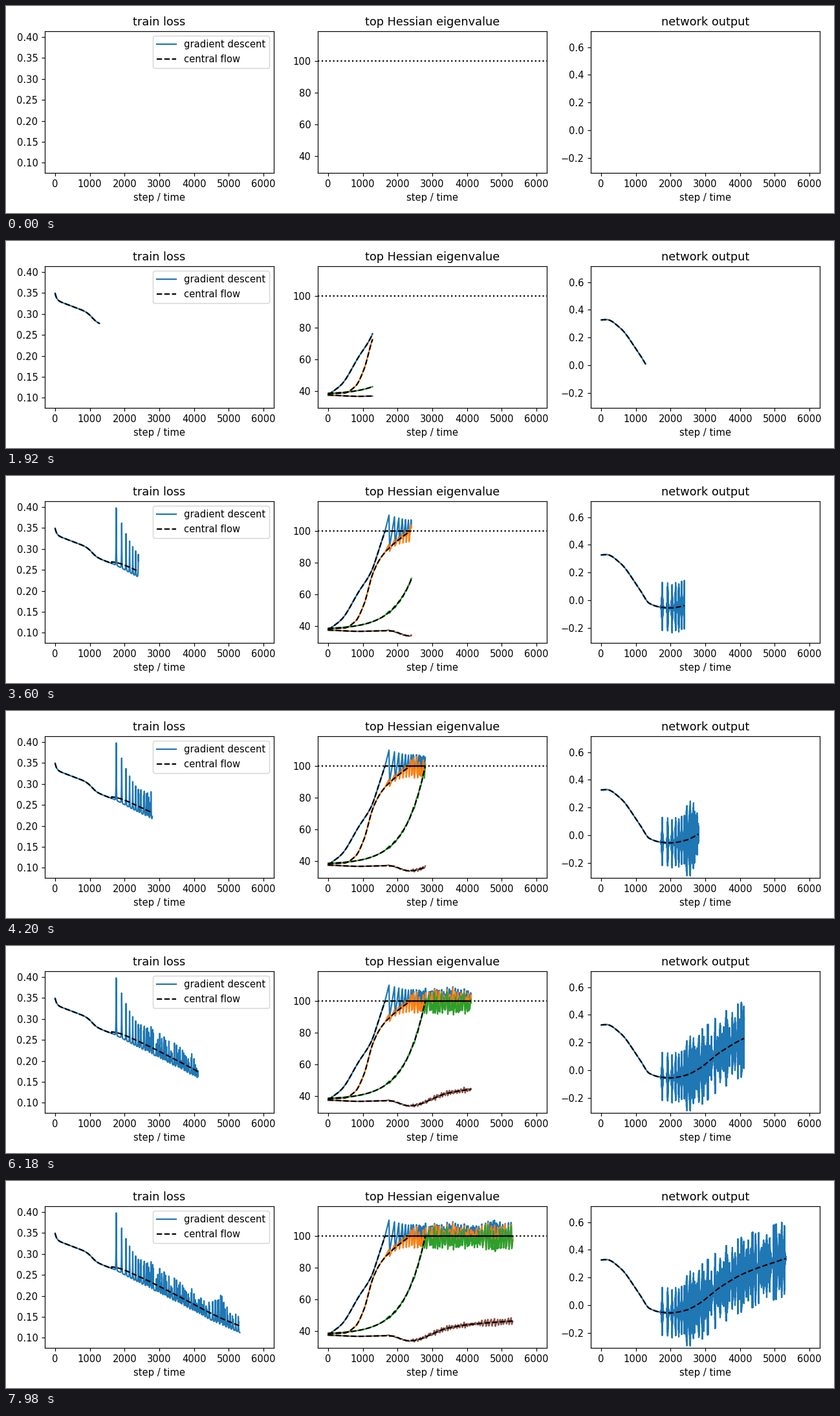
Animation, 1280 px wide and 320 px high, one loop 8 s. Source, as a matplotlib script:

```python
import numpy as np
import matplotlib.pyplot as plt
from matplotlib.animation import FuncAnimation

W, H = 1280, 320
LOOP_MS, FRAMES, STRIDE = 8000, 267, 20
END, EDGE = 5400, 1640  # last step, start of the oscillating regime
steps = np.arange(END + 1)
rng = np.random.default_rng(5)


def curve(*points):
    """Monotone cubic through a few (step, value) points."""
    x, y = np.array(points, float).T
    h, d = np.diff(x), np.diff(y) / np.diff(x)
    m = np.concatenate([d[:1], np.zeros(len(d) - 1), d[-1:]])
    same = d[:-1] * d[1:] > 0
    a, b = d[:-1][same], d[1:][same]
    m[1:-1][same] = 2 * a * b / (a + b)
    i = np.clip(np.searchsorted(x, steps, side="right") - 1, 0, len(h) - 1)
    u = np.clip((steps - x[i]) / h[i], 0, 1)
    return (y[i] * (1 + 2 * u) * (1 - u) ** 2 + y[i + 1] * u**2 * (3 - 2 * u)
            + h[i] * u * (1 - u) * (m[i] * (1 - u) - m[i + 1] * u))


def spike_train(t, extra_gap, extra_amp):
    """Spikes that settle to a steady rhythm, then turn irregular."""
    train, k = [], 0
    while t < END + 150:
        jitter = np.clip((t - 2400) / 300, 0, 1)
        amp = 6 + extra_amp * .75**k + rng.uniform(-1.6, 1.8) * jitter
        amp += 4 * np.exp(-((t - 4760) / 130) ** 2)
        train.append((t, amp))
        t += 70 + extra_gap * .62**k + rng.uniform(-12, 30) * jitter
        k += 1
    return train


def sawtooth(start, train):
    """Slow rise to each spike, then a sharp drop."""
    x, y = [start], [0]
    for t, amp in train:
        x += [t - 5, t + 12]
        y += [amp, -amp]
    return np.interp(steps, x, y, left=0)


def pulse(t, width):
    return np.exp(-np.abs(steps - round(t)) / width)


# Smooth flow
early_loss = (.3335 + .016 * np.exp(-steps / 45) - 3.1e-5 * steps
              - .0175 / (1 + np.exp((1060 - steps) / 75)))
late_loss = curve((EDGE, .2692), (1800, .2668), (2300, .2505), (3460, .2032),
                  (4720, .149), (END, .1255))
loss_flow = np.where(steps < EDGE - 15, early_loss, late_loss)

out_flow = curve((0, .327), (150, .330), (557, .267), (1116, .076), (1395, -.023),
                 (1730, -.050), (2000, -.055), (2420, -.037), (2810, .010),
                 (3428, .130), (4118, .230), (END, .345))

eig_flow = [
    curve((0, 37.5), (400, 44.5), (880, 61.6), (1240, 74.2), (1440, 86.5),
          (EDGE, 100), (1700, 104)),
    curve((0, 38.4), (450, 38.7), (785, 43), (1030, 53.5), (1285, 72.9),
          (1500, 82.5), (1755, 89.2), (2360, 100), (2500, 102.4)),
    38 + 15.7 * np.exp((steps - 1985) / 592),
    curve((0, 37.5), (880, 36.7), (1750, 37.1), (2350, 33.8), (3440, 41.8),
          (4130, 44.3), (END, 46.5)),
]
eig_flow = [np.minimum(e, 100) for e in eig_flow]

# Three unstable directions, each with its own train of spikes
trains = [spike_train(1760, 88, 4), spike_train(2459, 40, 0), spike_train(2960, 20, 0)]
saws = [sawtooth(t0, tr) for t0, tr in zip((EDGE, 2360, 2870), trains)]

# Discrete descent
eigs = [
    eig_flow[0] + saws[0] + .2 * saws[1],
    eig_flow[1] + saws[1] + .24 * saws[0],
    eig_flow[2] + saws[2] + .08 * saws[0] + .15 * saws[1],
]
ranked = np.sort(eigs, axis=0)[::-1]
eigs = [np.where(steps > EDGE, r, e) for r, e in zip(ranked, eigs)]
eigs.append(eig_flow[3] + .04 * saws[0] + .13 * saws[1] + .17 * saws[2])

bump = np.zeros(END + 1)
swing = np.zeros(END + 1)
for train in trains:
    for t, amp in train:
        height = .00137 * amp**2 * np.exp((1760 - t) / 5000)
        bump = np.maximum(bump, height * pulse(t, 6))
        size = rng.uniform(.16, .25) * rng.choice([-1, 1]) if t > 2420 else .18
        swing += size * pulse(t, 12)

sag = .0035 + .0125 * (1 - np.exp(-(steps - EDGE) / 400))
loss = np.where(steps < EDGE, early_loss, late_loss - sag + bump)
output = out_flow + np.clip(swing, -.27, .27) * (-1.0) ** steps

# Figure
fig = plt.figure(figsize=(12, 3), dpi=H / 3, facecolor="white")


def panel(left, title, ylim):
    ax = fig.add_axes([left / W, 62.5 / H, 354.2 / W, 218.5 / H])
    ax.set(title=title, xlabel="step / time", xlim=(-300, 6300), ylim=ylim)
    return ax


ax_loss = panel(59.8, "train loss", (.0765, .4139))
ax_eig = panel(481.8, "top Hessian eigenvalue", (29.6, 118.8))
ax_out = panel(903.9, "network output", (-.305, .7145))

moving = []


def add(ax, data, color, style="-", label=None):
    line, = ax.plot([], [], style, color=color, label=label)
    moving.append((line, data))


add(ax_loss, loss, "C0", label="gradient descent")
add(ax_loss, loss_flow, "black", "--", "central flow")
ax_loss.legend(loc="upper right")

ax_eig.axhline(100, color="black", ls=":")
for data, color in zip(eigs, ("C0", "C1", "C2", "C5")):
    add(ax_eig, data, color)
for data in eig_flow:
    add(ax_eig, data, "black", "--")

add(ax_out, output, "C0")
add(ax_out, out_flow, "black", "--")


def update(frame):
    n = frame * STRIDE + 1 if frame else 0
    for line, data in moving:
        line.set_data(steps[:n], data[:n])
    return [line for line, _ in moving]


anim = FuncAnimation(fig, update, frames=FRAMES, interval=LOOP_MS / FRAMES,
                     repeat=True, repeat_delay=0, blit=False)
plt.show()
```
